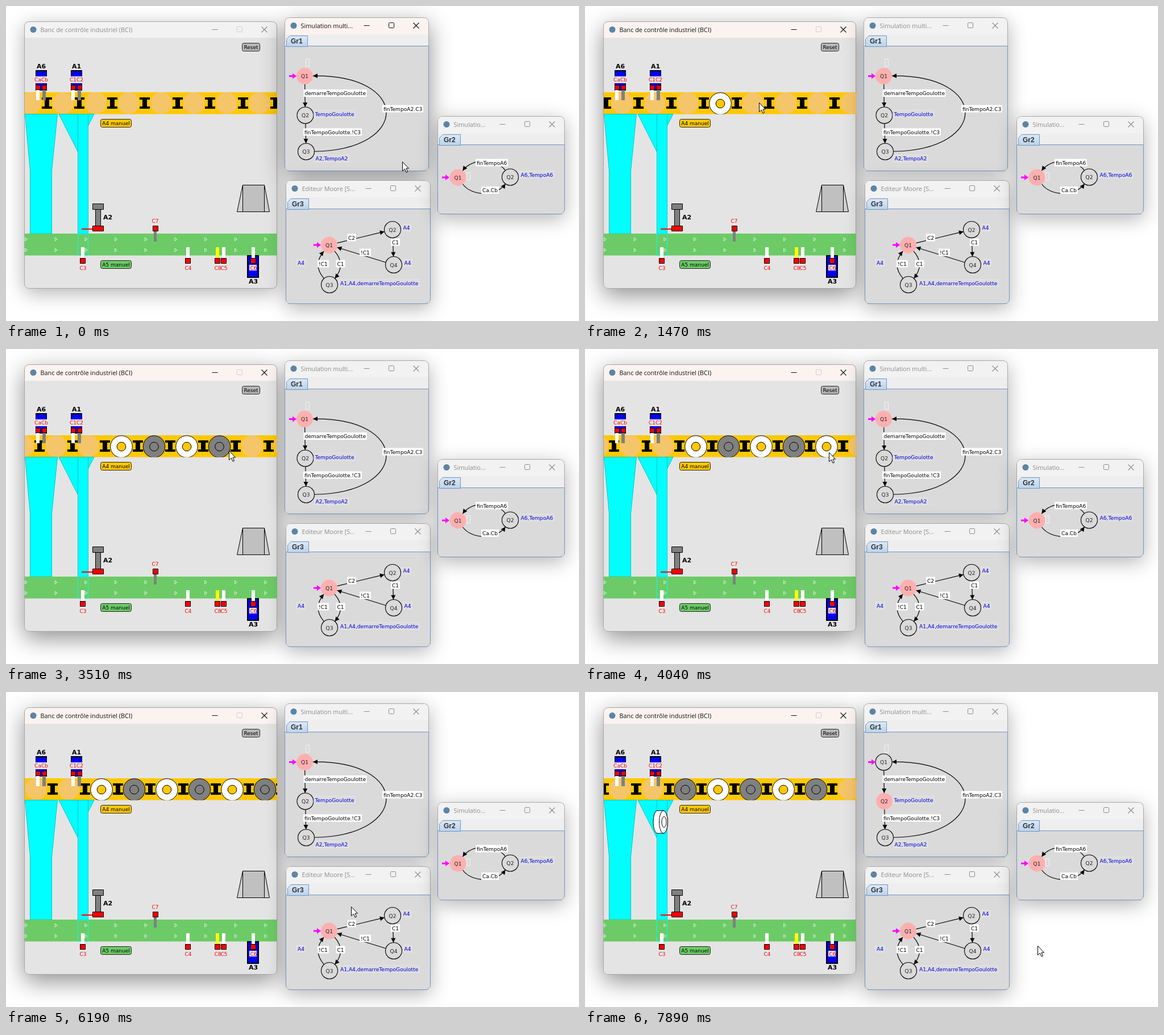
Write an HTML page with a canvas that moves like this. It is 1008 px wide and 555 px high and loops after 8000 ms.

```html
<!DOCTYPE html>
<html lang="fr">
<head>
<meta charset="utf-8">
<title>Banc de contrôle industriel</title>
<style>
  html, body { margin: 0; width: 100%; height: 100%; overflow: hidden; background: #fff; }
  canvas { display: block; width: 1008px; height: 555px; }
</style>
</head>
<body>
<canvas id="stage" width="1008" height="555"></canvas>
<script>
const ctx = document.getElementById('stage').getContext('2d');
const LOOP = 8000, PITCH = 57.5, R = 14.5;
const ORANGE = '#ffc800', RED = '#f00', BLUE = '#0000f0', GREY = '#808080', GREEN = '#6ccb66';
const SMALL = '9px "DejaVu Sans", sans-serif';
const GRAPH = '9.1px "DejaVu Sans", sans-serif';
const BOLD = 'bold 11px "DejaVu Sans", sans-serif';
const TAB = 'bold 12px "Liberation Sans", Arial, sans-serif';
const TITLE = '10.85px "Open Sans", sans-serif';

// Key points: time, then position.
const BELT = [[0, 273], [930, 238], [1700, 238], [2580, 216], [4040, 195], [4900, 195],
  [5350, 180], [6900, 157], [LOOP, 115]];
const POINTER = [[0, 698, 274], [800, 230, 175], [1200, 230, 170], [1470, 306, 170], [1740, 306, 170],
  [2580, 327, 175], [4040, 429, 182], [4400, 429, 182], [4560, 473, 173], [5350, 467, 179],
  [5950, 499, 317], [6600, 790, 482], [6900, 796, 449], [LOOP, 796, 447]];
const PLACED = [800, 1740, 2440, 3300, 4000, 5600];
const FOCUS = 800, PUSH = 7610, DROP = 7740;

function track(keys, t) {
  const i = keys.findIndex(k => k[0] > t), a = keys[i - 1], b = keys[i];
  const f = (t - a[0]) / (b[0] - a[0]);
  return a.slice(1).map((v, j) => Math.round(v + (b[j + 1] - v) * f));
}

function paint(fill, line, width = 1) {
  if (fill) { ctx.fillStyle = fill; ctx.fill(); }
  if (line) { ctx.strokeStyle = line; ctx.lineWidth = width; ctx.stroke(); }
}
function fillBox(x, y, w, h, color) { ctx.fillStyle = color; ctx.fillRect(x, y, w, h); }
function box(x, y, w, h, fill, line = '#000', r = 0) {
  ctx.beginPath(); ctx.roundRect(x + .5, y + .5, w, h, r); paint(fill, line);
}
function poly(points, fill, line) {
  ctx.beginPath();
  points.forEach(([x, y]) => ctx.lineTo(x, y));
  ctx.closePath(); paint(fill, line);
}
function strokes(color, width, ...lines) {
  ctx.beginPath();
  lines.forEach(([x0, y0, x1, y1]) => { ctx.moveTo(x0, y0); ctx.lineTo(x1, y1); });
  paint(null, color, width);
}
function oval(x, y, rx, ry, fill, line, width) {
  ctx.beginPath(); ctx.ellipse(x, y, rx, ry, 0, 0, Math.PI * 2); paint(fill, line, width);
}
function disc(x, y, r, fill, line, width) { oval(x, y, r, r, fill, line, width); }
function text(s, x, y, font, color = '#000', align = 'left') {
  ctx.font = font; ctx.fillStyle = color; ctx.textAlign = align;
  ctx.fillText(s, x, y);
}

function frame(x, y, w, h, active) {
  ctx.save();
  ctx.shadowColor = active ? 'rgba(0,0,0,.44)' : 'rgba(0,0,0,.3)';
  ctx.shadowBlur = active ? 42 : 34;
  ctx.shadowOffsetY = active ? 12 : 8;
  ctx.beginPath(); ctx.roundRect(x, y, w, h, 8); paint('#e4e4e4');
  ctx.restore();
}
function titleBar(x, y, w, title, active, canMax = true) {
  const ink = active ? '#111' : '#8c8c8c', right = x + w, mid = y + 14.5;
  const l = right - 27.5, r = right - 17.5, top = mid - 5, bottom = mid + 5;
  ctx.beginPath(); ctx.roundRect(x, y, w, 30, [8, 8, 0, 0]);
  paint(active ? '#fbf3ef' : '#f2f2f2');
  disc(x + 16, mid, 5.5, '#5b84a6');
  text(title, x + 28.5, mid + 4, TITLE, ink);
  strokes(ink, 1.1, [l - 87, mid, r - 87, mid], [l, top, r, bottom], [r, top, l, bottom]);
  ctx.beginPath(); ctx.roundRect(l - 43, top, 9, 9, 1);
  paint(null, canMax ? ink : '#cfcfcf');
}
function graphWindow(x, y, w, h, title, tab, active) {
  const l = x + 3.5, top = y + 32.5, base = y + 50.5, rim = '#6f94c4';
  frame(x, y, w, h, active);
  ctx.save();
  ctx.beginPath(); ctx.roundRect(x, y, w, h, 8); ctx.clip();
  fillBox(x, y, w, h, '#eeeeee');
  titleBar(x, y, w, title, active);
  fillBox(x, y + 50, w, h, '#dadada');
  const shade = ctx.createLinearGradient(0, top, 0, base);
  shade.addColorStop(0, '#dce9f7'); shade.addColorStop(1, '#bcd4ec');
  poly([[l, base + 1], [l, top + 6], [l + 6, top], [l + 37, top], [l + 37, base + 1]], shade, rim);
  strokes(rim, 1, [x, base, l, base], [l + 37, base, x + w, base]);
  text(tab, x + 11, y + 46, TAB, '#333');
  box(x, y, w - 1, h - 1, null, '#a8a8a8', 8);
  strokes(rim, 1, [x + .5, base, x + .5, y + h - 5], [x + w - .5, base, x + w - .5, y + h - 5],
    [x + 3, y + h - .5, x + w - 3, y + h - .5]);
  ctx.restore();
}

function node(name, [x, y], lit) {
  disc(x, y, R, lit ? '#ffafaf' : null, lit ? null : '#000', 1.1);
  text(name, x, y + 3.5, GRAPH, '#222', 'center');
}
function entry(x, y) {
  fillBox(x, y - 1.5, 7, 3, '#f0f');
  poly([[x + 6, y - 5], [x + 13, y], [x + 6, y + 5]], '#f0f');
}
// Arrow between two nodes: leaves and arrives turned by `bend`, bulging with `pull`.
function link([ax, ay], [bx, by], bend = 0, pull = .3) {
  const angle = Math.atan2(by - ay, bx - ax), out = angle - bend, back = angle + Math.PI + bend;
  const reach = R + pull * Math.hypot(bx - ax, by - ay);
  const x = bx + R * Math.cos(back), y = by + R * Math.sin(back);
  ctx.beginPath();
  ctx.moveTo(ax + R * Math.cos(out), ay + R * Math.sin(out));
  ctx.bezierCurveTo(ax + reach * Math.cos(out), ay + reach * Math.sin(out),
    bx + reach * Math.cos(back), by + reach * Math.sin(back), x, y);
  paint(null, '#000', 1.2);
  ctx.save();
  ctx.translate(x, y); ctx.rotate(back);
  poly([[0, 0], [8, -4], [8, 4]], '#000');
  ctx.restore();
}
function label(s, x, y, ink, fill, rim) {
  ctx.font = GRAPH;
  box(x - 2, y - 7, Math.round(ctx.measureText(s).width) + 3, 12, fill, rim);
  text(s, x, y + 3, GRAPH, ink);
}
function guard(s, x, y) { label(s, x, y, '#000', '#fff', '#fff'); }
function action(s, x, y) { label(s, x, y, '#0000e6', '#dcdcdc', '#e6e6e6'); }

function feedGraph(t) {
  const q1 = [525.5, 123.5], q2 = [526.5, 192.5], q3 = [528, 256.5], fired = t >= PUSH;
  graphWindow(490, 20, 254, 271, 'Simulation multi...', 'Gr1', t < FOCUS);
  box(527, 93, 6, 13, null, '#f2f2f2');
  entry(498, 123.5);
  link(q1, q2);
  link(q2, q3);
  link(q3, q1, -Math.PI / 2, 1.28);
  node('Q1', q1, !fired);
  node('Q2', q2, fired);
  node('Q3', q3, false);
  guard('demarreTempoGoulotte', 525.5, 154);
  guard('finTempoGoulotte.!C3', 525, 222.5);
  guard('finTempoA2.C3', 664, 181.5);
  action('TempoGoulotte', 543.5, 190.5);
  action('A2,TempoA2', 544.5, 269);
}
function sortGraph(t) {
  const q1 = [568.5, 421], q2 = [680, 394], q3 = [569, 491], q4 = [682, 456];
  const pushing = t >= PUSH && t < DROP;
  graphWindow(492, 307, 255, 218, 'Editeur Moore [S...', 'Gr3', false);
  entry(541, 421);
  link(q1, q2);
  link(q2, q4);
  link(q4, q1);
  link(q1, q3, .71);
  link(q3, q1, .71);
  node('Q1', q1, !pushing);
  node('Q2', q2, false);
  node('Q4', q4, false);
  node('Q3', q3, pushing);
  guard('C2', 602, 408.5);
  guard('C1', 679, 416.5);
  guard('!C1', 624, 434.5);
  guard('!C1', 550, 454.5);
  guard('C1', 582.5, 454.5);
  action('A4', 698.5, 391);
  action('A4', 700.5, 453);
  action('A4', 513, 453);
  action('A1,A4,demarreTempoGoulotte', 588, 488.5);
}
function rejectGraph() {
  const q1 = [795, 302], q2 = [887, 301.5];
  graphWindow(759, 194, 224, 173, 'Simulatio...', 'Gr2', false);
  box(810, 293, 6, 13, null, '#f2f2f2');
  entry(767, 302);
  link(q1, q2, -.95);
  link(q2, q1, -.95);
  node('Q1', q1, true);
  node('Q2', q2, false);
  guard('finTempoA6', 828, 276.5);
  guard('Ca.Cb', 838, 325);
  action('A6,TempoA6', 905.5, 297.5);
}

function wheel(x, grey) {
  disc(x, 172, 19.3, grey ? GREY : '#fff', '#000');
  disc(x, 172, 7.8, grey ? GREY : ORANGE, '#000');
}
function fallingWheel(x, y) {
  ctx.beginPath();
  ctx.ellipse(x - 6, y, 7, 20, 0, Math.PI / 2, Math.PI * 1.5);
  ctx.ellipse(x + 5, y, 7.5, 20, 0, -Math.PI / 2, Math.PI / 2);
  ctx.closePath(); paint('#fff', '#000');
  oval(x + 5, y, 7.5, 20, '#fff', '#000');
  oval(x + 6, y, 4, 9.5, '#fff', '#000');
}
function upperBelt(t) {
  const [head] = track(BELT, t);
  ctx.save();
  ctx.beginPath(); ctx.rect(33, 152, 444, 38.5); ctx.clip();
  fillBox(33, 152, 444, 39, ORANGE);
  for (let i = -6; i < 9; i++) {
    const x = head + i * PITCH, left = Math.round(x + PITCH / 2) - 9;
    disc(x, 171, 19, '#f5c569');
    fillBox(left, 161, 18, 4, '#000');
    fillBox(left + 5, 165, 8, 12, '#000');
    fillBox(left, 177, 18, 4, '#000');
  }
  PLACED.forEach((at, i) => {
    if (t >= at && (i || t < DROP)) wheel(head + i * PITCH, i % 2);
  });
  ctx.restore();
}
function lowerBelt() {
  fillBox(33, 401, 444, 38.5, GREEN);
  for (let x = 33.5; x < 470; x += 52.7) {
    for (const y of [411, 430]) poly([[x, y - 3], [x + 4, y], [x, y + 3]], null, '#d9f2d6');
  }
  box(126, 401, 18, 38, null, '#0ff');
}
function sensor(name, x, color) {
  fillBox(x - 3, 425, 6, 20, color);
  box(x - 5, 444, 9, 9, RED);
  text(name, x + .5, 465, SMALL, RED, 'center');
}
function actuator(x, name, sensors) {
  text(name, x, 110, BOLD, '#000', 'center');
  fillBox(x - 10, 113, 20, 36, '#000');
  fillBox(x - 9, 115, 18, 33, BLUE);
  fillBox(x - 12, 124, 24, 12, '#e4e4e4');
  text(sensors, x, 133, SMALL, RED, 'center');
  fillBox(x - 9, 147, 6, 19, '#fff');
  fillBox(x + 2, 147, 6, 19, GREY);
  box(x - 10, 139, 8, 8, RED);
  box(x + 1, 139, 8, 8, RED);
}
function button(s, x, y, w, fill) {
  box(x, y, w, 14, fill, '#222', 3);
  text(s, x + w / 2 + .5, y + 10.5, SMALL, '#000', 'center');
}

function bench(t) {
  const rim = '#00c8c8', active = t >= FOCUS;
  frame(32, 27, 445, 471, active);
  titleBar(32, 27, 445, 'Banc de contrôle industriel (BCI)', active, false);
  fillBox(32, 56, 445, 434, '#e4e4e4');
  box(32, 27, 444, 470, null, '#a6a6a6', 8);

  upperBelt(t);
  actuator(62, 'A6', 'CaCb');
  actuator(124, 'A1', 'C1C2');

  poly([[33.5, 190.5], [90.5, 190.5], [80.5, 290], [80.5, 401], [42.5, 401], [42.5, 290]], '#0ff', rim);
  poly([[93, 190.5], [155, 190.5], [144.5, 211], [144.5, 401], [126.5, 401], [126.5, 257]], '#0ff', rim);
  strokes(rim, 1, [126.5, 190, 126.5, 401], [144.5, 190, 144.5, 401]);
  if (t >= DROP) fallingWheel(133, Math.round(193 + (t - DROP) * .24));
  lowerBelt();

  fillBox(133, 392, 19, 2, RED);
  box(152, 387, 19, 9, RED);
  box(157, 358, 9, 29, GREY);
  box(152, 348, 19, 10, GREY);
  text('A2', 171, 376, BOLD);

  text('C7', 262.5, 382, SMALL, RED, 'center');
  fillBox(260, 397, 5, 18, GREY);
  box(258, 387, 9, 9, RED);

  poly([[416.5, 315.5], [454.5, 315.5], [463.5, 362.5], [406.5, 362.5]], '#d0d0d0', '#000');
  box(416, 315, 38, 47, '#c0c0c0');

  fillBox(424, 439, 21, 40, '#000');
  fillBox(426, 441, 17, 36, BLUE);
  text('A3', 435, 489, BOLD, '#000', 'center');
  fillBox(428, 456, 13, 10, '#e4e4e4');
  sensor('C3', 135, '#fff');
  sensor('C4', 320, '#fff');
  sensor('C8', 372, '#ff0');
  sensor('C5', 383, '#fff');
  sensor('C6', 435, '#fff');

  button('Reset', 415, 65, 31, '#b8b8b8');
  button('A4 manuel', 166, 199, 54, ORANGE);
  button('A5 manuel', 166, 448, 54, GREEN);
}

function pointer(t) {
  const [x, y] = track(POINTER, t);
  ctx.save();
  ctx.translate(x + .5, y + .5);
  poly([[0, 0], [0, 16], [4, 12.5], [6.5, 18.5], [9, 17.5], [6.5, 11.5], [11, 11.5]], '#fff', '#000');
  ctx.restore();
}

const start = performance.now();
function draw() {
  const t = (performance.now() - start) % LOOP;
  fillBox(0, 0, 1008, 555, '#fff');
  bench(t);
  feedGraph(t);
  sortGraph(t);
  rejectGraph();
  pointer(t);
  requestAnimationFrame(draw);
}
draw();
</script>
</body>
</html>
```
